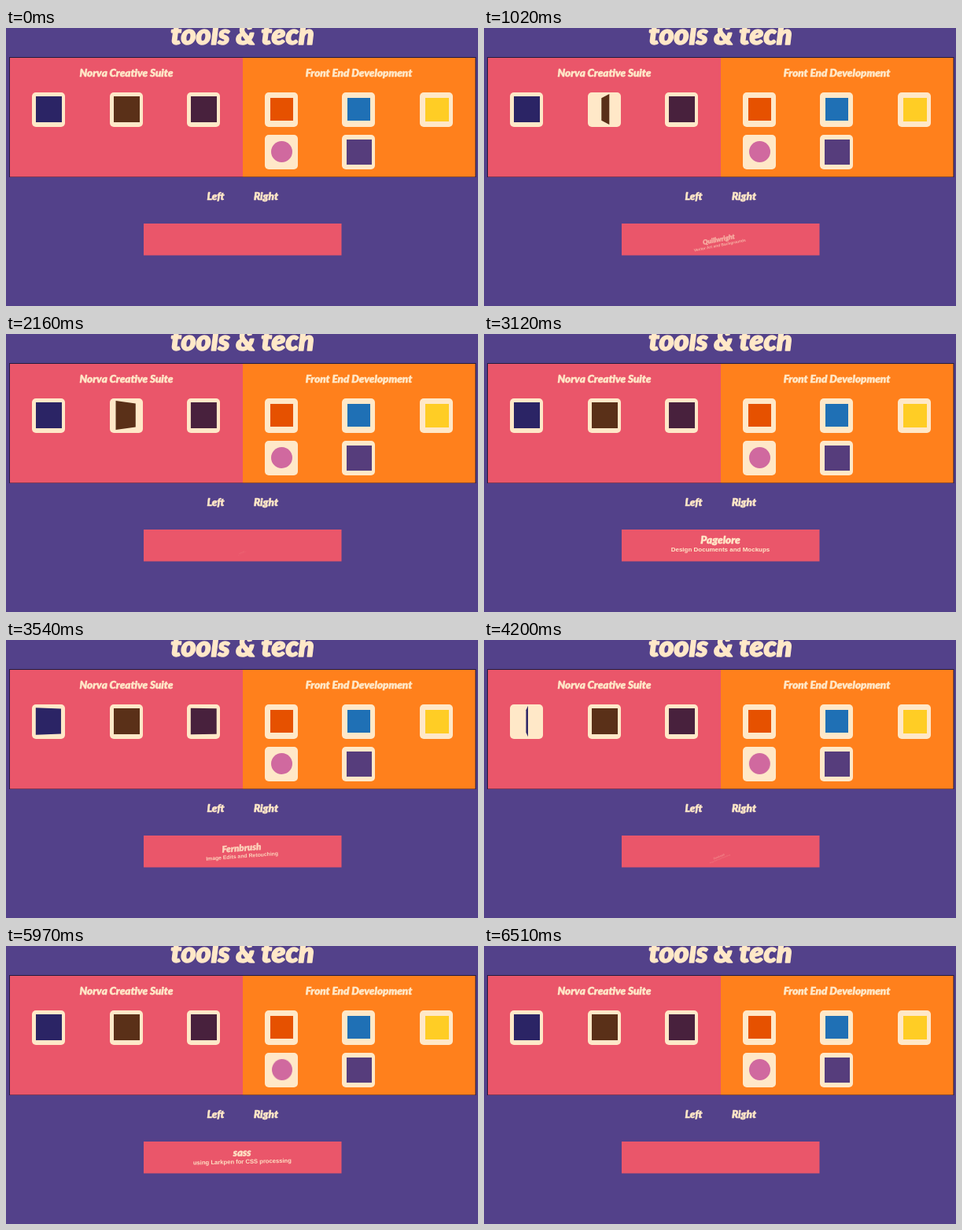
Write an HTML page that moves like this. It is 600 by 354 pixels and loops after 6.6 s.

```html
<!DOCTYPE html>
<html lang="en">
<head>
<meta charset="utf-8">
<title>tools &amp; tech</title>
<style>
html, body { margin: 0; width: 100%; height: 100%; overflow: hidden; background: #53418a; }
svg { position: absolute; left: 0; top: 0; }
text {
  fill: #ffe8c8; stroke: #ffe8c8; stroke-width: .5px; stroke-linejoin: round;
  text-anchor: middle; font: italic 900 13.5px Lato, sans-serif;
}
.title { font-size: 36.3px; stroke-width: 1.4px; }
.note { font: bold 8px "Liberation Sans", Arial, sans-serif; stroke: none; }
.tile, .mark { position: absolute; }
.tile { width: 42px; height: 44px; border-radius: 5px; background: #ffe8c8; }
</style>
</head>
<body>
<svg width="600" height="354">
  <rect x="4" y="37" width="593.5" height="153" fill="#241a3c"/>
  <rect x="5" y="38" width="296" height="151.5" fill="#ea566a"/>
  <rect x="301" y="38" width="295.5" height="151.5" fill="#ff801c"/>
  <rect x="175" y="249" width="251.5" height="40.5" fill="#ea566a"/>
  <text class="title" x="300.5" y="20.5">tools &amp; tech</text>
  <text x="153" y="62">Norva Creative Suite</text>
  <text x="448.5" y="62">Front End Development</text>
  <text x="266.5" y="219">Left</text>
  <text x="330.5" y="219">Right</text>
  <g id="captions"></g>
</svg>
<script>
const LOOP = 6600, SPIN_IN = 900, FAST = 500;

// Marks with a caption spin when entered and spin back when left.
const marks = [
  { x: 54.5, y: 104, size: 33, color: '#2b2465', enter: 3260, leave: 3980,
    name: 'Fernbrush', note: 'Image Edits and Retouching' },
  { x: 153, y: 104, size: 33, color: '#5a3018', enter: 840, leave: 1860,
    name: 'Quillwright', note: 'Vector Art and Backgrounds' },
  { x: 251.5, y: 104, size: 33, color: '#48213d', enter: 2150, leave: 3120,
    name: 'Pagelore', note: 'Design Documents and Mockups' },
  { x: 350, y: 104, size: 29, color: '#e65100' },
  { x: 448.5, y: 104, size: 29, color: '#1f70b5' },
  { x: 547.5, y: 104, size: 30, color: '#ffcd25' },
  { x: 350, y: 158, size: 27, color: '#d0699f', round: true, enter: 4180, leave: 5940,
    name: 'sass', note: 'using Larkpen for CSS processing' },
  { x: 448.5, y: 158, size: 32, color: '#563d7c' }
];

// cubic-bezier(.25, .1, .25, 1)
function ease(t) {
  if (t <= 0) return 0;
  if (t >= 1) return 1;
  const curve = (u, a, b) => 3 * u * (1 - u) ** 2 * a + 3 * u * u * (1 - u) * b + u ** 3;
  let lo = 0, hi = 1;
  for (let i = 0; i < 24; i++) {
    const mid = (lo + hi) / 2;
    if (curve(mid, .25, .25) < t) lo = mid; else hi = mid;
  }
  return curve(lo, .1, 1);
}

function addBox(className, x, y, style) {
  const box = document.createElement('div');
  box.className = className;
  box.style.left = x + 'px';
  box.style.top = y + 'px';
  Object.assign(box.style, style);
  document.body.append(box);
  return box;
}

const captions = document.getElementById('captions');
for (const m of marks) {
  addBox('tile', m.x - 21.2, m.y - 22.2);
  m.box = addBox('mark', m.x - m.size / 2, m.y - m.size / 2 - .5, {
    width: m.size + 'px', height: m.size + 'px',
    background: m.color, borderRadius: m.round ? '50%' : 0
  });
  if (!m.name) continue;
  m.caption = document.createElementNS('http://www.w3.org/2000/svg', 'g');
  m.caption.innerHTML = `<text y="-13">${m.name}</text><text class="note" y="-3">${m.note}</text>`;
  captions.append(m.caption);
}

function draw(now) {
  const t = now % LOOP;
  for (const m of marks) {
    if (!m.caption) continue;
    const left = 1 - ease((t - m.leave) / FAST);
    const spin = ease((t - m.enter) / SPIN_IN) * left;
    const shown = ease((t - m.enter) / FAST) * left;
    m.box.style.transform = spin % 1 ? `perspective(100px) rotateY(${spin * 360}deg)` : 'none';
    m.caption.setAttribute('transform',
      `translate(300.5 280) rotate(${-30 * (1 - shown)}) scale(${shown})`);
    m.caption.setAttribute('opacity', shown);
  }
}

const start = performance.now();
function tick() {
  draw(performance.now() - start);
  requestAnimationFrame(tick);
}
tick();
</script>
</body>
</html>
```
